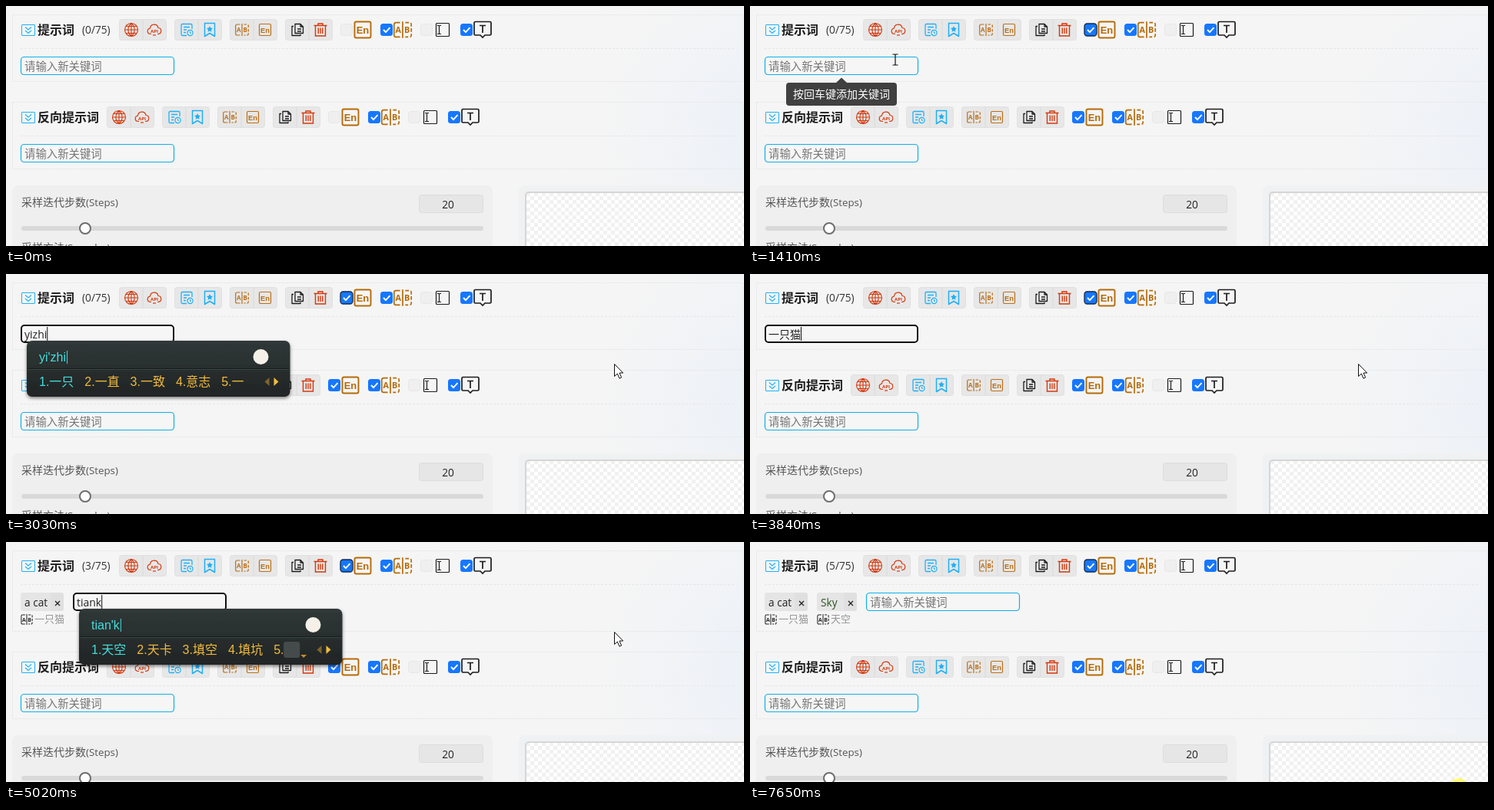
Write an HTML page that moves like this. It is 960 by 313 pixels and loops after 7.72 s.

```html
<!DOCTYPE html>
<html lang="zh">
<head>
<meta charset="utf-8">
<title>提示词</title>
<style>
html, body { margin: 0; width: 100%; height: 100%; overflow: hidden; background: #f5f5f5; }
svg { display: block; width: 960px; height: 313px; font-family: "Open Sans", "Noto Sans CJK SC", "Noto Sans CJK", sans-serif; }
text { white-space: pre; }
.ime { font-family: "Liberation Sans", "Noto Sans CJK SC", "Noto Sans CJK", sans-serif; }
</style>
</head>
<body>
<svg id="stage" viewBox="0 0 960 313" xmlns="http://www.w3.org/2000/svg"></svg>
<script>
const LOOP = 7720, STEP = 200 / 3;
const RED = '#d4380d', BLUE = '#1fb0f5', BROWN = '#b8701a', INK = '#1c1c1c';
const stage = document.getElementById('stage');

const rect = (x, y, w, h, r, fill, more = '') =>
  `<rect x="${x}" y="${y}" width="${w}" height="${h}" rx="${r}" fill="${fill}" ${more}/>`;
const text = (x, y, s, size, fill, more = '') =>
  `<text x="${x}" y="${y}" font-size="${size}" fill="${fill}" ${more}>${s}</text>`;
const path = (d, color, w = 1.2, more = '') =>
  `<path d="${d}" fill="none" stroke="${color}" stroke-width="${w}" ${more}/>`;
const at = (x, y, s, k = 1) => `<g transform="translate(${x} ${y}) scale(${k})">${s}</g>`;
const mid = 'text-anchor="middle"';
const bold = mid + ' font-weight="700"';

// Icons, all centred on 0,0
const globe = path('M-8.5 0a8.5 8.5 0 1 0 17 0a8.5 8.5 0 1 0-17 0H8.5M0-8.5V8.5M0-8.5C-5.5-4-5.5 4 0 8.5C5.5 4 5.5-4 0-8.5M-7-4.5H7M-7 4.5H7', RED, 1.1);
const cloud = path('M-4 5.5H-5C-10 5-10-1-5.500-2C-5-8.500 4-8.500 5-2.500C10-2 10 5 5 5.500H4', RED) +
  text(0, 4, 'API', 6, RED, bold) + path('M-2 7H2', RED);
const notes = path('M7-1V-6Q7-7.500 5.500-7.500H-5.500Q-7-7.500-7-6V6Q-7 7.500-5.500 7.500H0M-4-3.500H4M-4 0H0M-4 3.500H-1', BLUE, 1.3) +
  `<circle cx="4.500" cy="4" r="3.600" fill="none" stroke="${BLUE}" stroke-width="1.200"/>` + path('M4.500 2V4.300H6', BLUE, 1);
const mark = path('M-6.500-8.500H6.500V8.500L0 4.500L-6.500 8.500Z', BLUE, 1.5, 'stroke-linejoin="round"') +
  `<path d="M0-5L1.200-2.400L4-2L2 0L2.500 2.800L0 1.500L-2.500 2.800L-2 0L-4-2L-1.200-2.400Z" fill="${BLUE}"/>`;
const ab = (c, w = 1.2) => path('M-2.500-7H-6.500Q-8.300-7-8.300-5V5Q-8.300 7-6.500 7H-2.500M0-8V8', c, w) +
  path('M2.500-7H6.500Q8.300-7 8.300-5V5Q8.300 7 6.500 7H2.500', c, w, 'stroke-dasharray="3.500 1.800"') +
  text(-4.2, 3, 'A', 8, c, bold) + text(4.2, 3, 'B', 8, c, bold);
const en = (c, w = 1.2) => rect(-7.5, -7.5, 15, 15, 1.5, 'none', `stroke="${c}" stroke-width="${w}"`) +
  text(0, 3.6, 'En', 9.3, c, bold + ' font-family="Liberation Sans, sans-serif"');
const copy = path('M-3-7.500H4L7.500-4V4.500H-3ZM4-7.500V-4H7.500M-5-4.500H-7V7.500H4V6M0-1H5M0 2H5', INK, 1.3, 'stroke-linejoin="round"');
const trash = path('M-8.500-5.500H8.500M-3-5.500V-8H3V-5.500M-6.500-5.500V8H6.500V-5.500M-2.700-2.500V5M0-2.500V5M2.700-2.500V5', RED, 1.4);
const field = rect(-8.5, -8.5, 17, 17, 1, 'none', `stroke="${INK}" stroke-width="1.200"`) +
  path('M-7-5.500H-5.300Q-4.500-5.500-4.500-4.500V4.500Q-4.500 5.500-5.300 5.500H-7M-2-5.500H-3.700Q-4.500-5.500-4.500-4.500M-2 5.500H-3.700Q-4.500 5.500-4.500 4.500', INK, 1.2);
const bubble = path('M-9.500-10.500H9.500Q11-10.500 11-9V5.500Q11 7 9.500 7H3L0 10L-3 7H-9.500Q-11 7-11 5.500V-9Q-11-10.500-9.500-10.500Z', INK, 1.7) +
  path('M-4-5.500H4M0-5.500V4', INK, 1.7);

const box = (x, on, ring) => on
  ? rect(x, 23, 16, 16, 3.5, '#1677ff', ring ? 'stroke="#12294d" stroke-width="1.300"' : '') +
    path(`M${x + 4} 31l3 3.200l5.500-6`, '#fff', 1.9)
  : rect(x + .5, 23.5, 15, 15, 3, '#efefef', 'stroke="#e6e6e6"');

function pair(x, a, b) {
  return rect(x + .5, 17.5, 61, 27, 3, '#e7e7e7', 'stroke="#e0e0e0"') +
    path(`M${x + 31} 18V44`, '#dadada', 1) + at(x + 16, 31, a) + at(x + 46, 31, b);
}

// Title line of a prompt panel; dx moves everything right of the title
function header(title, dx) {
  return rect(20.5, 24.5, 17, 14, .5, 'none', `stroke="${BLUE}"`) +
    path('M25 27.500l4 3.500l4-3.500M25 32l4 3.500l4-3.500', BLUE, 1.1) +
    text(41, 37, title, 16, INK, 'font-weight="700"') +
    path('M19 55.500H948', '#e6e6e6', 1, 'stroke-dasharray="3 2"') +
    at(dx, 0, pair(147, globe, cloud) + pair(219, notes, mark) +
      pair(291, ab(BROWN), en(BROWN)) + pair(363, copy, trash) +
      at(464, 31, en('#b56a08', 1.35), 1.4) +
      box(487, true) + at(516, 31, ab('#b56a08', 1.25), 1.35) +
      box(539, false) + at(568, 31, field) + box(591, true) + at(620, 31, bubble));
}

function input(x, s, focus, caret) {
  const frame = focus ? rect(x + 1, 67, 198, 22, 4, '#f6f6f6', 'stroke="#111" stroke-width="2"')
    : rect(x + .5, 66.5, 199, 23, 4, '#f6f6f6', 'stroke="#12aee8" stroke-width="1.200"');
  const w = caret ? measure(s) : 0;
  return frame + (s ? text(x + 5, 84, s, 14, '#222') : text(x + 5, 84, '请输入新关键词', 14.4, '#757575')) +
    (caret ? path(`M${x + 5.5 + w} 69V87`, '#111', 1) : '');
}

const pen = document.createElement('canvas').getContext('2d');
function measure(s) {
  pen.font = '14px "Open Sans", "Noto Sans CJK SC", "Noto Sans CJK", sans-serif';
  return pen.measureText(s).width;
}

function tag(x, s, w, sub, color) {
  return rect(x, 66, w, 24, 3, '#e5e5e5') + rect(x + w - 17, 66, 17, 24, 3, '#e0e0e0') +
    text(x + 5, 84, s, 13.7, color) +
    path(`M${x + w - 11} 77l6 6m0-6l-6 6`, '#222', 1.3) +
    at(x + 8, 101, ab('#222'), .86) + text(x + 18, 105, sub, 13, '#969696');
}

function tip(cx, y, s) {
  const w = s.length * 14 + 18;
  return `<path d="M${cx - 7} ${y}l7-6.500l7 6.500z" fill="#404040"/>` +
    rect(cx - w / 2, y, w, 30, 4, '#404040') + text(cx, y + 20, s, 14, '#fff', mid);
}

function popup(x, typed, words) {
  let px = x + 16, list = '';
  words.forEach((word, i) => {
    list += text(px, 146, `${i + 1}.${word === '#' ? '' : word}`, 16, i ? '#f3bb3c' : '#46dede');
    if (word === '#') list += rect(px + 13, 130, 21, 21, 3, '#454b4b') +
      `<path d="M${px + 35} 147h8l-4 4z" fill="#c58a2a"/>`;
    px += 13.3 + 16 * word.length + 14;
  });
  const right = px - 14 + 60;
  pen.font = '16px "Liberation Sans", sans-serif';
  const cx = x + 17 + pen.measureText(typed).width;
  return `<g class="ime">${rect(x, 87, right - x, 73, 7, 'url(#dark)', 'filter="url(#drop)"')}` +
    path(`M${x + 1} 123.500H${right - 1}`, '#161a1a', 1) + path(`M${x + 1} 124.500H${right - 1}`, '#3d4444', 1) +
    text(x + 16, 114, typed, 16, '#46dede') + path(`M${cx + .5} 100V117`, '#46dede', 1) + list +
    `<circle cx="${right - 38}" cy="108" r="10" fill="#f5f0e8"/>` +
    `<path d="M${right - 27} 135v11l-6-5.500z" fill="#80662c"/>` +
    `<path d="M${right - 21} 135v11l6-5.500z" fill="#f3bb3c"/></g>`;
}

// Pointer path: time, x, y
const route = [
  [70, 609, 172], [200, 585, 150], [400, 520, 90], [600, 452, 36], [660, 443, 30], [930, 443, 30],
  [1130, 310, 54], [1330, 195, 69], [1390, 189, 70], [1670, 189, 70], [1800, 330, 112],
  [1930, 560, 135], [2030, 720, 136], [2130, 791, 117], [6790, 791, 117], [6930, 815, 165],
  [7070, 862, 245], [7180, 889, 292], [7240, 910, 318]
];
function pointer(t) {
  if (t < 70 || t >= 7240) return '';
  const q = Math.max(70, Math.floor(t / STEP) * STEP);
  let i = 0;
  while (i < route.length - 2 && route[i + 1][0] <= q) i++;
  const [a, ax, ay] = route[i], [b, bx, by] = route[i + 1];
  const k = Math.min(1, (q - a) / (b - a));
  const x = ax + (bx - ax) * k, y = ay + (by - ay) * k;
  if (x < 219 && y > 65 && y < 91)
    return at(x, y, path('M-3.500-7H-1Q0-7 0-6V6Q0 7-1 7H-3.500M3.500-7H1Q0-7 0-6M3.500 7H1Q0 7 0 6', '#111', 1.2));
  return at(x, y, '<path d="M.500.500V16.500L4.300 13L7 19.200L9.600 18L7 12H11.700Z" fill="#fff" stroke="#111"/>');
}

// Typing: time, input text, pinyin line, candidate words
const one = ['一', '有', '又', '也', '以'], two = ['一只', '一直', '一致', '意志', '一'];
const three = ['一只猫', '一只毛', '一只帽', '一致', '一'], long = ['一只猫', '一只没', '一只马', '一直没', '一致吗'];
const sky = ['天空', '天卡', '填空', '填坑', '#'], day = ['天', '田', '填', '甜', '添'], he = ['他', '她', '太', '听', '天'];
const typing = [
  [2690, 'y', 'y', one], [2760, 'yi', 'yi', one], [2960, 'yiz', "yi'z", two], [3030, 'yizhi', "yi'zhi", two],
  [3380, 'yizhim', "yi'zhi'm", long], [3450, 'yizhima', "yi'zhi'ma", long], [3580, 'yizhimao', "yi'zhi'mao", three],
  [3840, '一只猫'], [4170, ''],
  [4430, 't', 't', he], [4500, 'ti', 'ti', he], [4630, 'tia', 'tia', day], [4760, 'tian', 'tian', day],
  [5020, 'tiank', "tian'k", sky], [5090, 'tianko', "tian'ko", sky], [5160, 'tiankon', "tian'kon", sky],
  [5290, 'tiankong', "tian'kong", sky], [5500, '天空'], [5700, '']
];
const within = (t, a, b) => t >= a && t < b;
const halo = (x, y) => `<circle cx="${x}" cy="${y}" r="13" fill="#ff0" fill-opacity=".5"/>`;

function overlay(t) {
  const [, typed, pinyin, words] = typing.filter(k => k[0] <= t).pop() || [0, ''];
  let x = 19, s = '';
  if (t >= 4170) {
    const done = t >= 4240;
    s += done ? tag(19, 'a cat', 56, '一只猫', '#222') : tag(19, '一只猫', 69, '', '#222');
    x = done ? 87 : 100;
  }
  if (t >= 5700) {
    const done = t >= 6030;
    s += done ? tag(87, 'Sky', 52, '天空', '#2a5320') : tag(87, '天空', 55, '', '#2a5320');
    x = done ? 151 : 154;
  }
  const focus = within(t, 1610, 7650);
  const caret = focus && !within(t, 2090, 2690) && !within(t, 6560, 7060);
  s += input(x, typed, focus, caret);
  s += text(99, 36, `(${t >= 6100 ? 5 : t >= 4240 ? 3 : 0}/75)`, 13.7, '#333');
  s += box(435, t >= 870, true);
  if (within(t, 667, 940)) s += tip(456, 53, '是否自动翻译新的关键词到英文');
  if (within(t, 1390, 1740)) s += tip(119, 100, '按回车键添加关键词');
  if (words) s += popup(x + 8, pinyin, words);
  if (within(t, 733, 870)) s += halo(443, 30);
  if (within(t, 1610, 1680)) s += halo(189, 70);
  if (t >= 7650) s += halo(922, 321);
  return s + pointer(t);
}

const panel = h => rect(8.5, 11.5, 950, h, 0, 'none', 'stroke="#e7e8ea" stroke-dasharray="4 1"');
stage.innerHTML = `<defs>
  <radialGradient id="glow" gradientUnits="userSpaceOnUse" cx="1000" cy="170" r="230">
    <stop stop-color="#ebf1f9"/><stop offset="1" stop-color="#f5f5f5"/></radialGradient>
  <linearGradient id="dark" x2="0" y2="1"><stop stop-color="#303838"/><stop offset="1" stop-color="#202424"/></linearGradient>
  <filter id="drop" x="-5%" y="-10%" width="110%" height="130%"><feDropShadow dx="0" dy="2" stdDeviation="2" flood-opacity=".5"/></filter>
  <pattern id="check" width="10" height="10" patternUnits="userSpaceOnUse" x="677" y="243">
    <path d="M0 0H10V10H0z" fill="#fff"/><path d="M0 0H5V5H0zM5 5H10V10H5z" fill="#f1f1f1"/></pattern>
</defs>` + rect(0, 0, 960, 313, 0, 'url(#glow)') +
  '<g id="frame"></g>' + header('提示词', 0) +
  '<g id="low">' + at(0, 114, panel(87) + header('反向提示词', -16) + '<g id="sync"></g>' + input(19, '', false, false)) +
  rect(8, 234, 625, 120, 8, '#efefef') + text(20, 261, '采样迭代步数', 14, '#555') + text(104, 261, '(Steps)', 13.3, '#555') +
  rect(537.5, 246.5, 83, 23, 3, '#e6e6e6', 'stroke="#dcdcdc"') + text(575, 264, '20', 13.7, '#222', mid) +
  rect(20, 287, 601, 6, 3, '#d9d9d9') + '<circle cx="103" cy="290" r="7" fill="#fff" stroke="#6e6e6e" stroke-width="2"/>' +
  text(20, 320, '采样方法', 14, '#555') + text(76, 320, '(Sampler)', 13.3, '#555') +
  rect(667, 234, 310, 120, 8, '#f0f1f2') + rect(676, 243, 300, 120, 4, 'url(#check)', 'stroke="#d6d6d6" stroke-width="2"') +
  '</g><g id="top"></g>';

const $ = id => document.getElementById(id);
const last = {};
function fill(id, s) {
  if (last[id] !== s) $(id).innerHTML = last[id] = s;
}
function paint(t) {
  const grow = t >= 4170 ? 18 : 0;
  fill('frame', panel(87 + grow));
  fill('sync', box(419, t >= 870));
  $('low').setAttribute('transform', `translate(0 ${grow})`);
  fill('top', overlay(t));
}

const start = performance.now();
function tick() {
  paint((performance.now() - start) % LOOP);
  requestAnimationFrame(tick);
}
tick();
</script>
</body>
</html>
```
